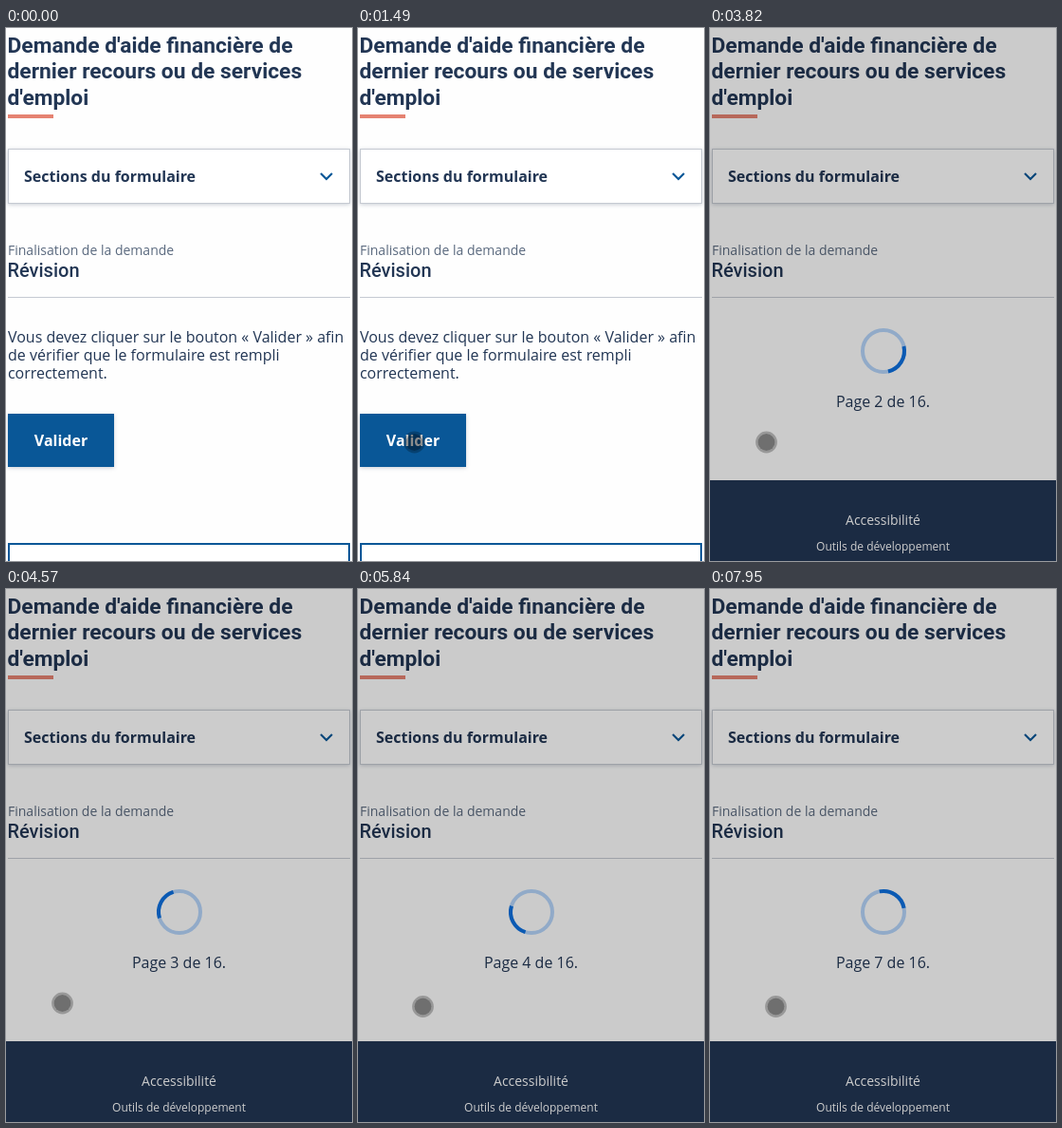
Write an HTML page that moves like this. It is 365x561 px and loops after 8000 ms.

```html
<!DOCTYPE html>
<html lang="fr">
<head>
<meta charset="utf-8">
<title>Révision du formulaire</title>
<style>
  html, body { margin: 0; width: 100%; height: 100%; overflow: hidden; background: #fefefe; }
  svg { display: block; width: 365px; height: 561px; }
  text { font-family: "Open Sans", "Noto Sans", sans-serif; font-size: 16px; fill: #223654; }
  .title, .step { font-family: Roboto, Arial, sans-serif; }
  .title { font-size: 22.8px; font-weight: 700; }
  .step { font-size: 20px; font-weight: 500; }
  .bold { font-weight: 700; }
  .label { font-size: 14px; fill: #5b6a7f; }
  .mid { text-anchor: middle; }
  .foot text { fill: #fff; text-anchor: middle; font-size: 12px; }
  .foot .big { font-size: 14px; }
  .card { filter: drop-shadow(0 1px 2px rgba(34, 54, 84, .24)); }
</style>
</head>
<body>
<svg viewBox="0 0 365 561">
  <rect width="365" height="561" fill="#fefefe"/>

  <g class="heading">
    <text class="title" x="1.5" y="26">Demande d'aide financière de</text>
    <text class="title" x="1.5" y="53.4">dernier recours ou de services</text>
    <text class="title" x="1.5" y="80.8">d'emploi</text>
    <rect x="2" y="91" width="48" height="4" fill="#e58271"/>
  </g>

  <rect class="card" x="2.5" y="127.5" width="360" height="57" fill="#fff" stroke="#c5cad2"/>
  <text class="bold" x="19" y="162">Sections du formulaire</text>
  <path d="M332 153l6 6 6-6" fill="none" stroke="#095797" stroke-width="2.2"/>

  <text class="label" x="2" y="239">Finalisation de la demande</text>
  <text class="step" x="1.5" y="262">Révision</text>
  <rect x="2" y="283" width="361" height="1" fill="#c5cad2"/>

  <g id="form">
    <text x="2" y="331">Vous devez cliquer sur le bouton « Valider » afin</text>
    <text x="2" y="350">de vérifier que le formulaire est rempli</text>
    <text x="2" y="369">correctement.</text>
    <rect class="card" x="2" y="406" width="112" height="56" fill="#095797"/>
    <text class="bold mid" x="58" y="440" style="fill:#fff">Valider</text>
    <rect x="3" y="543" width="359" height="60" fill="#fff" stroke="#095797" stroke-width="2"/>
  </g>

  <g id="wait">
    <g id="foot" class="foot">
      <rect y="441" width="365" height="104" fill="#223654"/>
      <text class="big" x="182.5" y="488">Accessibilité</text>
      <text x="182.5" y="515">Outils de développement</text>
      <text x="182.5" y="537">Version master</text>
    </g>
    <text id="page" class="mid" x="182.5" y="399"></text>
    <rect width="365" height="561" fill="#000" opacity=".2"/>
    <g fill="none" stroke-width="4" transform="translate(183 340)">
      <circle r="22" stroke="#91aac8"/>
      <path id="arc" d="M-15.56 -15.56A22 22 0 0 1 15.56 -15.56" stroke="#0b5ab3"/>
    </g>
  </g>

  <g id="cursor">
    <circle r="9" fill="#000" opacity=".45"/>
    <circle r="10.2" fill="none" stroke="#000" stroke-width="2.4" opacity=".25"/>
  </g>
</svg>
<script>
  const LOOP = 8000, SHOW = 450, BUSY = 3350, COUNT = 3430, TICK = 1000 / 15;
  const $ = id => document.getElementById(id);

  // time, x, y
  const path = [
    [450, 242, 546], [580, 226, 538], [720, 180, 513], [860, 128, 482],
    [980, 92, 456], [1090, 68, 437], [1210, 56, 428], [1340, 55, 428],
    [1490, 59.5, 436], [5200, 59.5, 436], [5600, 68.5, 439.5],
    [5850, 68.5, 439.5], [5920, 69.5, 439.5], [LOOP, 69.5, 439.5]
  ];

  function cursorAt(t) {
    const i = Math.max(1, path.findIndex(p => p[0] > t));
    const [a, b] = [path[i - 1], path[i]];
    const k = (t - a[0]) / (b[0] - a[0]);
    return [1, 2].map(n => a[n] + (b[n] - a[n]) * k);
  }

  const visible = (id, on) => $(id).style.display = on ? '' : 'none';

  function draw(now) {
    const t = now % LOOP;
    const busy = t >= BUSY, counting = t >= COUNT;
    visible('form', !busy);
    visible('wait', busy);
    visible('page', counting);
    visible('cursor', t >= SHOW);

    if (t >= SHOW) $('cursor').setAttribute('transform', `translate(${cursorAt(t)})`);
    if (busy) {
      const held = Math.floor((t - BUSY) / TICK + 0.01) * TICK;
      $('arc').setAttribute('transform', `rotate(${10 + held * 360 / 1500})`);
      $('foot').setAttribute('transform', `translate(0 ${counting ? 35 : 0})`);
      const page = Math.max(1, 2 + Math.floor((t - 3640) / 820));
      $('page').textContent = `Page ${page} de 16.`;
    }
    requestAnimationFrame(draw);
  }
  draw(performance.now());
</script>
</body>
</html>
```
